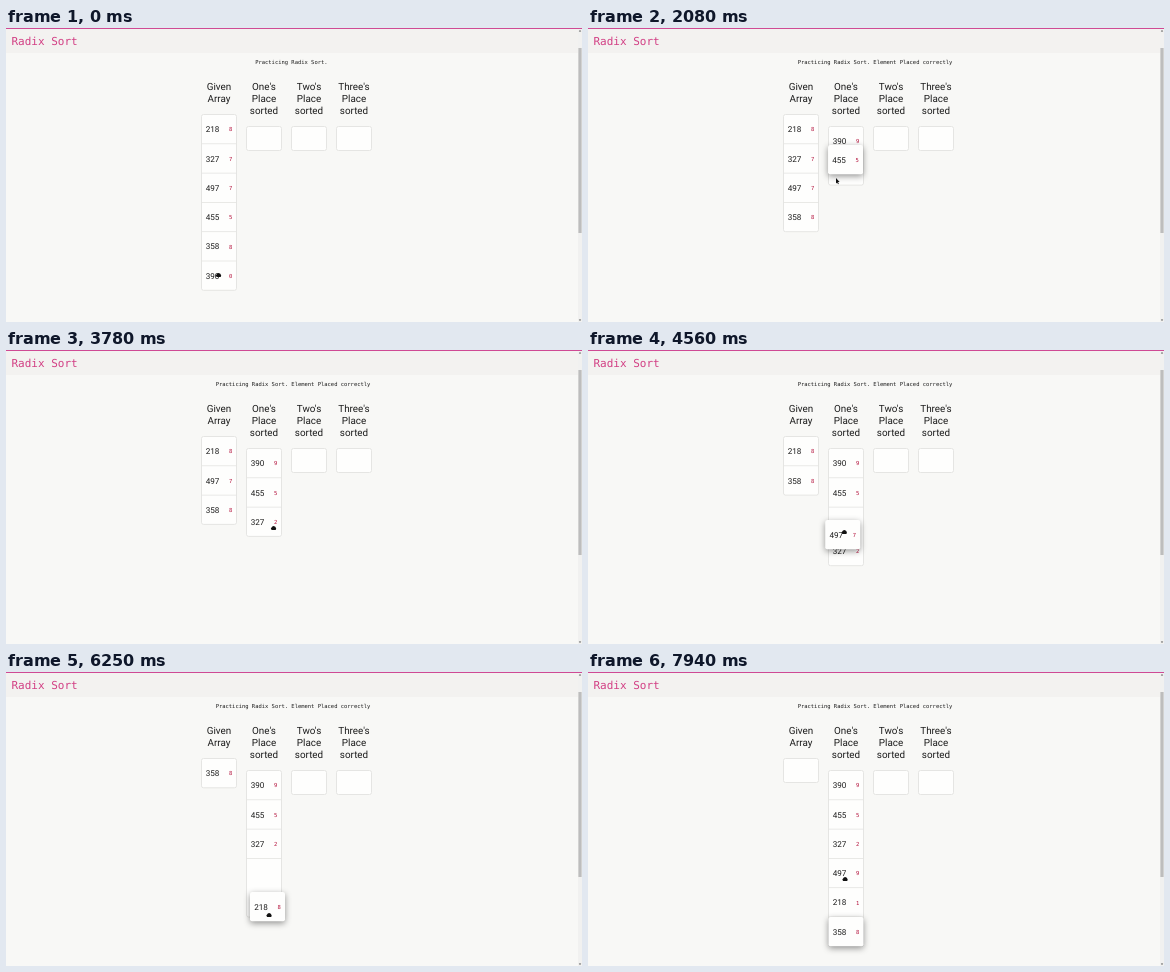
An HTML page with a canvas that plays this animation: 576 by 294 pixels, repeating every 8 s.

```html
<!DOCTYPE html>
<html lang="en">
<head>
<meta charset="utf-8">
<title>Radix Sort</title>
<style>
html, body { margin: 0; width: 100%; height: 100%; overflow: hidden; background: #f8f8f6; }
canvas { display: block; width: 576px; height: 294px; }
</style>
</head>
<body>
<canvas id="stage"></canvas>
<script>
const canvas = document.getElementById('stage');
const ctx = canvas.getContext('2d');
const scale = Math.max(1, window.devicePixelRatio || 1);
canvas.width = 576 * scale;
canvas.height = 294 * scale;

const LOOP = 8000, STEP = 130, SETTLE = 260, REACH = 300, LAG = 130;
const ROW = 29.3, WIDTH = 35, EMPTY = 24, INK = '#1c1c1c';
const MONO = '"DejaVu Sans Mono", monospace';
const SANS = 'Roboto, sans-serif';

const titles = ['Given Array', "One's Place sorted", "Two's Place sorted", "Three's Place sorted"];
const columns = titles.map((title, i) => ({ x: 195.5 + 45 * i, y: i ? 98.5 : 86.5, title }));
const [source, sorted] = columns;
const given = ['218', '327', '497', '455', '358', '390'];

// times: grab, arrive, drop; grip: mouse relative to the card; release: card corner on arrival
const drags = [
  { value: '390', times: [240, 640, 770], grip: [17, 14], release: [242, 100] },
  { value: '455', times: [1100, 1300, 2070], grip: [8, 34], release: [240, 116] },
  { value: '327', times: [3260, 3500, 3500], grip: [22.5, 18], release: [245, 160] },
  { value: '497', times: [4160, 4680, 4810], grip: [19, 12], release: [240, 188] },
  { value: '218', times: [5860, 6240, 6370], grip: [19, 23], release: [244, 220] },
  { value: '358', times: [6800, 7354, 7670], grip: [16, 14], release: [234.7, 243] }
].map(({ value, times: [grab, arrive, drop], grip, release }) =>
  ({ value, grab, arrive, drop, grip, release }));
const order = drags.map(d => d.value);
const rest = { at: [257, 207], time: 7930 };

drags.forEach((d, i) => {
  const left = given.filter(v => !order.slice(0, i).includes(v));
  d.home = [source.x, source.y + left.indexOf(d.value) * ROW];
  d.slot = [sorted.x, sorted.y + i * ROW];
});

const clamp = p => Math.max(0, Math.min(1, p));
const mix = (a, b, p) => a + (b - a) * p;
const mixPoint = (a, b, p) => a.map((v, i) => mix(v, b[i], p));
const add = (a, b) => a.map((v, i) => v + b[i]);
const easeOut = p => 1 - (1 - p) ** 2;
const smooth = p => p * p * (3 - 2 * p);

// Sideways movement runs ahead of the vertical one, then the card settles into its slot.
function cardAt(d, t) {
  const p = clamp((t - d.grab) / (d.arrive - d.grab));
  const held = [mix(d.home[0], d.release[0], easeOut(p)), mix(d.home[1], d.release[1], p)];
  return mixPoint(held, d.slot, easeOut(clamp((t - d.drop) / SETTLE)));
}

function mouseAt(t) {
  const i = drags.filter(d => t >= d.drop).length;
  const next = drags[i], last = drags[i - 1];
  if (next && (!last || t > next.grab))
    return { at: add(cardAt(next, t), next.grip), drag: next };
  const to = next ? add(next.home, next.grip) : rest.at;
  const end = next ? next.grab : rest.time;
  const start = Math.max(last.drop, end - REACH);
  const p = smooth(clamp((t - start) / (end - start)));
  return { at: mixPoint(add(last.release, last.grip), to, p), drag: last };
}

function text(str, x, y, font, color, align = 'center') {
  ctx.font = font;
  ctx.fillStyle = color;
  ctx.textAlign = align;
  ctx.fillText(str, x, y);
}

function rect(x, y, w, h, color) {
  ctx.fillStyle = color;
  ctx.fillRect(x, y, w, h);
}

function polygon(points, color) {
  ctx.beginPath();
  points.forEach(([x, y]) => ctx.lineTo(x, y));
  ctx.fillStyle = color;
  ctx.fill();
}

function panel(x, y, h) {
  ctx.beginPath();
  ctx.roundRect(x, y, WIDTH, h, 2);
  ctx.fillStyle = '#fefefd';
  ctx.fill();
}

function label(value, digit, x, y) {
  text(value, x + 4.2, y + 17.75, '8.15px ' + SANS, INK, 'left');
  text(digit, x + 29.2, y + 16.9, '5.5px ' + MONO, '#b3123c');
}

function drawPage() {
  rect(0, 0, 576, 294, '#f8f8f6');
  rect(0, 0, 572, 25, '#f3f2f0');
  rect(572, 0, 4, 294, '#f1f1f0');
  rect(572.4, 20, 3.2, 185, '#bdbdbd');
  rect(0, 0, 576, 1, '#cf4a94');
  polygon([[572.8, 3.5], [575.2, 3.5], [574, 2]], '#555');
  polygon([[572.8, 291.5], [575.2, 291.5], [574, 293]], '#555');
  text('Radix Sort', 5.5, 17, '11px ' + MONO, '#d23f84', 'left');
  for (const { x, title } of columns)
    title.split(' ').forEach((line, i) =>
      text(line, x + WIDTH / 2, 62.3 + 12 * i, '9.9px ' + SANS, INK));
}

// rows: [value, top]; a held card leaves a blank row
function drawColumn({ x, y }, rows, count, place) {
  const height = count * ROW || EMPTY;
  panel(x, y, height);
  ctx.strokeStyle = '#e0e0de';
  ctx.lineWidth = 0.8;
  ctx.stroke();
  for (const [value, top] of rows) {
    label(value, value[place], x, top);
    if (top + ROW < y + height - 1) rect(x, top + ROW - 0.4, WIDTH, 0.8, '#e4e4e2');
  }
}

function drawMouse(t) {
  const { at, drag } = mouseAt(t);
  ctx.save();
  ctx.translate(...at);
  if (drag.grip[1] > ROW) {
    polygon([[0, 0], [0, 5.4], [1.2, 4.4], [2, 6.2], [2.8, 5.8], [2, 4.1], [3.6, 4]], '#111');
  } else {
    polygon([[-2.7, 0.6], [-1.2, -1.4], [0.2, -2], [1.8, -1.3], [2.7, 0.4], [2.2, 2], [-1.8, 2]], '#111');
  }
  ctx.restore();
}

function draw(t) {
  ctx.setTransform(scale, 0, 0, scale, 0, 0);
  ctx.textRendering = 'geometricPrecision';
  drawPage();

  const done = drags.filter(d => t > d.drop + SETTLE).length;
  const drag = drags[done];
  const lifted = drag && t > drag.grab;
  const reached = lifted ? cardAt(drag, t - LAG) : [0, 0];
  const entered = reached[0] + WIDTH / 2 > sorted.x;
  const status = done ? 'Element Placed correctly' : '';
  text('Practicing Radix Sort. ' + status, 287, 36.2, '5.48px ' + MONO, INK);

  const left = given.filter(v => !order.slice(0, done + entered).includes(v));
  const leftRows = left.map((v, i) => [v, source.y + i * ROW])
    .filter(([v]) => !lifted || v !== drag.value);
  // Rows below the held card make room for it.
  const passed = (reached[1] - sorted.y) / ROW;
  const sortedRows = order.slice(0, done).map((v, i) =>
    [v, sorted.y + (i + (entered ? clamp(6 * (i - passed)) : 0)) * ROW]);

  drawColumn(source, leftRows, left.length, 2);
  drawColumn(sorted, sortedRows, done + entered, 1);
  columns.slice(2).forEach(column => drawColumn(column, [], 0));

  if (lifted) {
    const [x, y] = cardAt(drag, t);
    ctx.save();
    ctx.shadowColor = 'rgba(0,0,0,.42)';
    ctx.shadowBlur = 6 * scale;
    ctx.shadowOffsetY = 2 * scale;
    panel(x, y, ROW);
    ctx.restore();
    label(drag.value, drag.value[2], x, y);
  }
  drawMouse(t);
}

function frame(now) {
  draw(Math.floor(now % LOOP / STEP) * STEP);
  requestAnimationFrame(frame);
}
requestAnimationFrame(frame);
</script>
</body>
</html>
```
